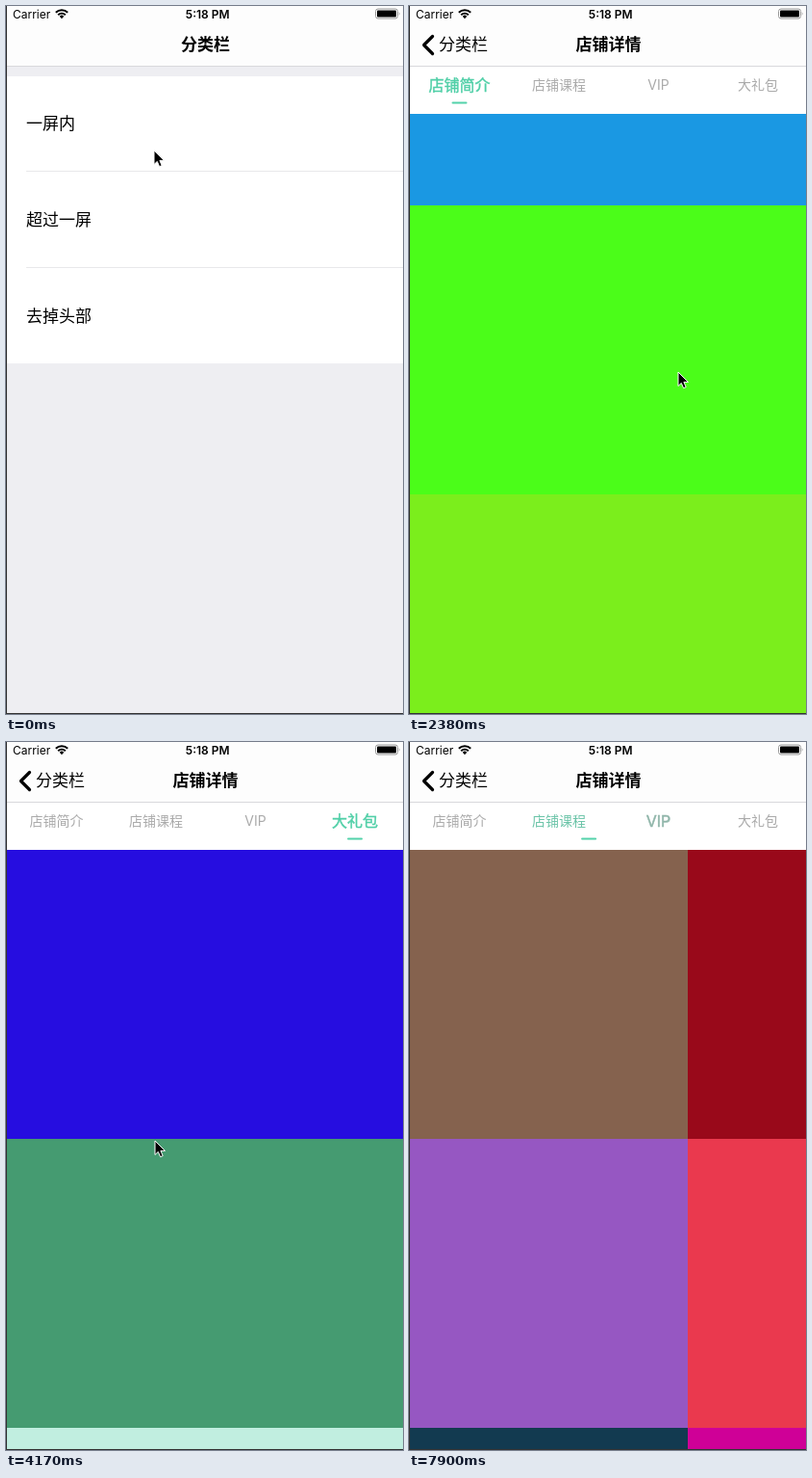
These frames come from a looping animation (413x735 px, 8 s). An HTML page:

```html
<!DOCTYPE html>
<html lang="zh-CN">
<head>
<meta charset="utf-8">
<style>
html, body { margin: 0; width: 100%; height: 100%; overflow: hidden; background: #fff; }
svg { display: block; width: 100vw; height: 100vh; }
text { font: 17px Inter, "Noto Sans CJK SC", "Noto Sans CJK", sans-serif; }
.mid { text-anchor: middle; }
.bold { font-weight: 600; }
.line { fill: none; stroke-linecap: round; stroke-linejoin: round; }
</style>
</head>
<body>
<svg viewBox="0 0 413 735">
  <g id="menu">
    <rect width="414" height="735" fill="#eeeef2"/>
    <rect y="73" width="414" height="298" fill="#fff"/>
    <path d="M21 171.5H414M21 271.5H414" stroke="#e8e8ea"/>
    <text x="21" y="128.4">一屏内</text>
    <text x="21" y="228.4">超过一屏</text>
    <text x="21" y="328.4">去掉头部</text>
  </g>

  <g id="shop">
    <rect x="1" y="62" width="413" height="673" fill="#fff"/>
    <g id="head">
      <g class="line" stroke="#444" stroke-width="1.2">
        <rect x="12.5" y="97.5" width="19" height="16" rx="2.5"/>
        <path d="M13 100l9 6.5 9-6.5M384.5 102v11.5M388.5 95v18.5M392.5 109v4.5M396.5 106v7.5M400.5 99v14.5M404.5 110v3.5"/>
      </g>
      <rect x="33" y="93" width="8" height="8" fill="#fa6a64"/>
      <text class="mid" x="211" y="223" style="font-size:11px" fill="#bdbdbd">会员</text>
      <g class="line" stroke="#b3a3f3" stroke-width="1.3">
        <circle cx="69.5" cy="314" r="11.5"/>
        <circle cx="69.5" cy="314" r="8" fill="#d5cbfa" stroke="none"/>
        <path d="M60 325h19"/>
        <path d="M66.5 309.5l3 4 3-4M69.5 313.5v5.5M66.5 314h6M66.5 316.5h6" stroke="#fff"/>
      </g>
      <g class="line" stroke="#f49a9a" stroke-width="1.3">
        <path d="M271.5 323v-8l5-4 6 3 9-7v16z" fill="#fbd3d3" stroke="none"/>
        <path d="M270 312l7-5 5 4 11-7M289 303.500h5v5M272 323.500v-8M278 323v-11M284 323v-8M291 323v-14M270 323.500h23"/>
      </g>
      <g fill="#555">
        <text x="92" y="309" style="font-size:13px">累计收益</text>
        <text x="304" y="309" style="font-size:13px">累计销量</text>
      </g>
      <rect x="1" y="349" width="413" height="10" fill="#f5f5fa"/>
    </g>
    <g id="pages"></g>
    <g id="bar">
      <rect x="1" y="359" width="413" height="50" fill="#fff"/>
      <g id="tabs"></g>
      <rect id="mark" y="396.500" width="16" height="2" rx="1" fill="#53d2aa"/>
    </g>
    <rect id="thumb" x="409" width="3" height="155" rx="1.5" fill="#116594"/>
  </g>

  <rect width="413" height="62" fill="#fdfdfd"/>
  <path d="M0 62.500H413" stroke="#d9d9dc"/>
  <text x="7" y="13" style="font-size:12px">Carrier</text>
  <g class="line" stroke="#000" stroke-width="2" style="stroke-linecap:butt">
    <path d="M51.800 6.700a9 9 0 0 1 12.400 0M54.200 9.200a5.500 5.500 0 0 1 7.600 0"/>
    <path d="M58 13.200l-2.200-2.400a3 3 0 0 1 4.400 0z" fill="#000" stroke="none"/>
  </g>
  <text class="mid bold" x="209.700" y="13" style="font-size:12px">5:18 PM</text>
  <rect x="384.500" y="3" width="23" height="10" rx="2.500" fill="none" stroke="#999"/>
  <rect x="386" y="4.500" width="20" height="7" rx="1"/>
  <path d="M408.800 6v4q1.500-2 0-4" fill="#888"/>
  <text class="mid bold" id="menuTitle" x="207.500" y="46.400">分类栏</text>
  <text class="mid bold" id="shopTitle" y="46.400">店铺详情</text>
  <g id="back">
    <path class="line" d="M24.500 31.500L15.500 40.500l9 9" stroke="#000" stroke-width="3.200"/>
    <text id="backText" y="46.400">分类栏</text>
  </g>

  <path id="cursor" d="M0 0v14.500l3.300-3.100 2.300 5.300 2.600-1.100-2.300-5.200h4.600z" stroke="#fff" stroke-width="1"/>
  <path d="M.5 0V735M0 734.500H413" stroke="#333"/>
</svg>
<script>
const $ = id => document.getElementById(id);
const LOOP = 8000, STEP = 149, W = 413, PIN = 297, ROW = 300;
const names = ['店铺简介', '店铺课程', 'VIP', '大礼包'];
const colors = [
  ['#b4729b', '#1a98e3', '#4bfd19', '#7bee1c'],
  ['#85624e', '#9657c2', '#123a50'],
  ['#99091a', '#ea394e', '#cf0097'],
  ['#260de0', '#459b71', '#c1eee0']
];

// Tracks are [step, value...] points joined by straight lines.
const slide = [[4, 413], [5, 310], [6, 110], [7, 15], [8, 1], [9, 0]];
const scroll = [[8, 0], [9, 25], [10, 130], [11, 300], [12, 480], [13, 600], [14, 690], [15, 755], [16, 802]];
const swipe = [[18, 0], [19, 50], [20, 210], [21, 342], [22, 413], [23, 560], [24, 826], [25, 1010],
  [26, 1195], [27, 1239], [28, 1239], [29, 1215], [32, 1040], [33, 900], [34, 826], [36, 822], [38, 770],
  [40, 705], [41, 696], [44, 648], [45, 648], [46, 642], [47, 642], [48, 687], [49, 788], [50, 782],
  [51, 717], [52, 642], [53, 537]];
const pointer = [[0, 154, 150], [3, 156, 139], [5, 156, 139], [8, 168, 421], [13, 276, 376], [16, 280, 380],
  [18, 300, 400], [21, 187, 402], [28, 155, 414], [32, 350, 412], [33, 380, 410], [35, 225, 406], [36, 202, 403]];
const picked = [[0, 0], [22, 1], [24, 2], [27, 3], [34, 2]];

function at(track, n, k = 1) {
  const i = track.findIndex(p => p[0] > n);
  if (i < 0) return track[track.length - 1][k];
  if (!i) return track[0][k];
  const a = track[i - 1], b = track[i];
  return a[k] + (b[k] - a[k]) * (n - a[0]) / (b[0] - a[0]);
}

const move = (el, x, y) => el.setAttribute('transform', `translate(${x} ${y})`);
const tint = w => 'rgb(' + [[170, 80], [170, 207], [170, 167]].map(([a, b]) => Math.round(a + (b - a) * w)) + ')';

$('pages').innerHTML = colors.map(list => '<g>' + list.map((c, i) =>
  `<rect y="${i * ROW}" width="${W}" height="${ROW}" fill="${c}"/>`).join('') + '</g>').join('');
$('tabs').innerHTML = names.map((s, i) =>
  `<text class="mid" x="${52.5 + 103.5 * i}">${s}</text>`).join('');
const pages = [...$('pages').children], tabs = [...$('tabs').children];

function draw(t) {
  const n = Math.floor((t + 12) / STEP);
  const x = at(slide, n), rest = x / W;
  move($('menu'), -0.3 * (W - x), 0);
  move($('shop'), x, 0);
  $('menu').style.display = x ? '' : 'none';
  $('menuTitle').style.opacity = rest;
  $('shopTitle').style.opacity = $('back').style.opacity = 1 - rest;
  $('shopTitle').setAttribute('x', 207.5 + 200 * rest);
  $('backText').setAttribute('x', 31 + 151 * rest);

  const s = at(scroll, n), lift = Math.min(s, PIN), inner = s - lift;
  move($('head'), 0, -lift);
  move($('bar'), 0, -lift);
  $('thumb').style.display = n > 8 && n < 16 ? '' : 'none';
  $('thumb').setAttribute('y', 411 - lift + inner * 0.224);

  const pos = at(swipe, n), p = pos / W;
  pages.forEach((g, i) => move(g, 1 + i * W - pos, 409 - lift - (i ? 0 : inner)));

  const sel = picked.filter(k => k[0] <= n).pop()[1];
  tabs.forEach((el, i) => {
    const big = i === sel, c = tint(Math.max(0, 1 - Math.abs(i - p)));
    el.setAttribute('y', big ? 385 : 384.3);
    el.style.fontSize = big ? '16px' : '14px';
    el.style.fill = c;
    el.style.stroke = big ? c : 'none';
    el.style.strokeWidth = 0.45;
  });
  $('mark').setAttribute('x', 44.5 + 103.5 * p);

  // From the last swipe on, the pointer holds the page.
  if (n > 36) move($('cursor'), 1024 - pos, 403);
  else move($('cursor'), at(pointer, n), at(pointer, n, 2));
}

function tick(now) {
  draw(now % LOOP);
  requestAnimationFrame(tick);
}
draw(0);
requestAnimationFrame(tick);
</script>
</body>
</html>
```
